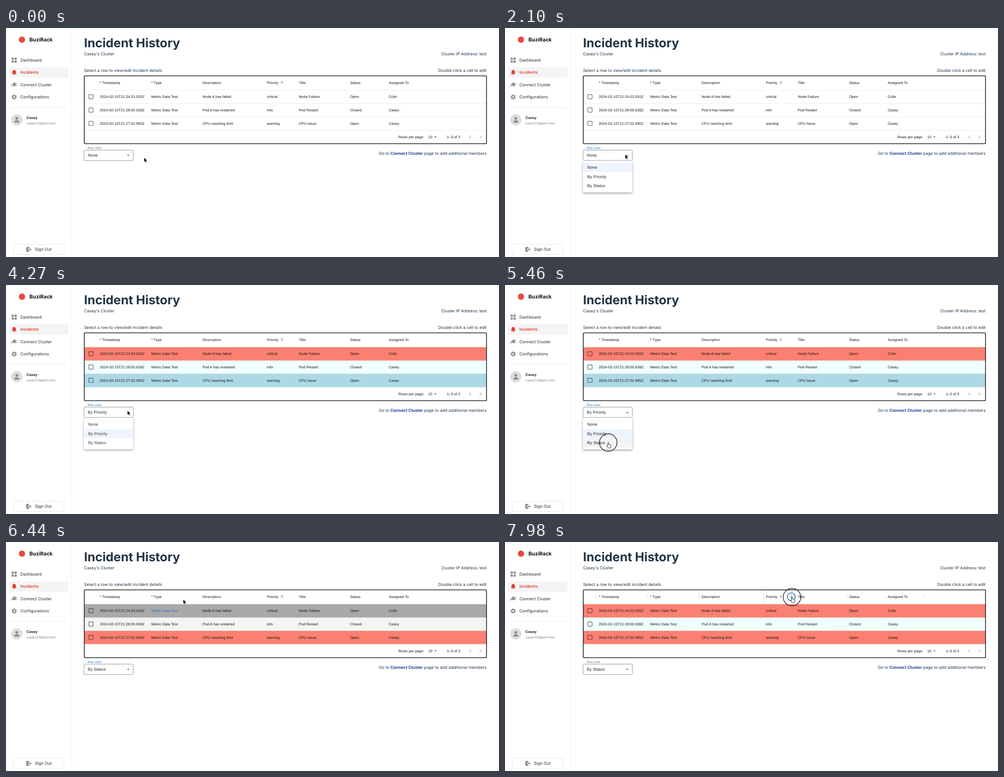
Animation of 1096x511 px, one loop 8 s. Source, as an HTML page:

```html
<!DOCTYPE html>
<html lang="en">
<head>
<meta charset="utf-8">
<title>Incident History</title>
<style>
  html, body { margin: 0; width: 100%; height: 100%; overflow: hidden; background: #fff; }
  svg { display: block; width: 100vw; height: 100vh; text-rendering: geometricPrecision; }
  text { white-space: pre; }
  .ui { font: 9.14px Inter, sans-serif; fill: #213547; }
  .side { font: 9.14px Inter, sans-serif; fill: #27272a; }
  .grid { font: 8px "Liberation Sans", Arial, sans-serif; letter-spacing: .0107em; fill: #111; }
  .field { font: 9.14px "Liberation Sans", Arial, sans-serif; letter-spacing: .0094em; fill: #222; }
  .label { font: 6.86px "Liberation Sans", Arial, sans-serif; letter-spacing: .0094em; }
  .end { text-anchor: end; }
  .icon { fill: #8e8e95; }
  #menu { filter: drop-shadow(0 2.3px 2.5px rgba(0,0,0,.38)); transform-origin: 228px 296px; }
</style>
</head>
<body>
<svg viewBox="0 0 1096 511" preserveAspectRatio="none">
  <!-- sidebar -->
  <path d="M146 0V511" stroke="#f0f0f1"/>
  <circle cx="35.5" cy="26" r="7" fill="#ea4a3c"/>
  <text class="side" x="52" y="30" style="font-size:11.43px;font-weight:700;fill:#111">BuziRack</text>
  <rect x="7" y="87.5" width="132" height="23" rx="3.5" fill="#f4f4f5"/>
  <g class="side">
    <text x="32" y="74.8">Dashboard</text>
    <text x="32" y="102.3" style="font-weight:600;fill:#e04032">Incidents</text>
    <text x="32" y="129.8">Connect Cluster</text>
    <text x="32" y="157.2">Configurations</text>
    <text x="64.5" y="497.3">Sign Out</text>
    <text x="45.5" y="202.6" style="font-size:8px;font-weight:700">Casey</text>
    <text x="45.5" y="214.6" style="font-size:6.86px;fill:#747a85">casey123@exm.test</text>
  </g>
  <g class="icon">
    <rect x="12.5" y="66" width="5" height="5" rx="1"/><rect x="19" y="66" width="5" height="5" rx="1"/>
    <rect x="12.5" y="72.5" width="5" height="5" rx="1"/><rect x="19" y="72.5" width="5" height="5" rx="1"/>
    <path d="M18.2 93.5q3.7.4 3.8 4.3v2.7l1.2 2.2H13.2l1.2-2.2v-2.7q.1-3.9 3.8-4.3zM16.6 103.4h3.2q-.3 1.5-1.6 1.5t-1.6-1.5z" fill="#e04032"/>
    <path d="M15.5 124l1.5-2h4.5v1.3H25v1.2h-3.5v2.6H25v1.2h-3.5v1.4H17l-1.5-2q-2.2 0-2.4 3.6h-1.3q0-6.3 3.7-6.3z"/>
    <g fill="none" stroke="#8e8e95"><circle cx="18.2" cy="154" r="3.2" stroke-width="2.6"/>
      <circle cx="18.2" cy="154" r="4.9" stroke-width="1.9" stroke-dasharray="2.4 2.73"/></g>
    <path d="M46.5 488.5h5.3v3h-2.3v5h2.3v3h-5.3q-1.5 0-1.5-1.5v-8q0-1.5 1.5-1.5zM50.5 493h3v-2l3.5 3-3.5 3v-2h-3z"/>
  </g>
  <path d="M8 177H138" stroke="#ebebed"/>
  <circle cx="24" cy="205" r="12.5" fill="#dcdcdc"/>
  <g fill="#8b8b8b"><circle cx="24" cy="201.8" r="3"/><path d="M18.5 211q0-5 5.5-5t5.5 5z"/></g>
  <rect x="16.5" y="482.5" width="112.5" height="23" rx="3" fill="none" stroke="#e6e6e8"/>

  <!-- page text -->
  <g class="ui">
    <text x="173.5" y="42.5" style="font-size:27.43px;font-weight:700">Incident History</text>
    <text x="173.5" y="61.2">Casey's Cluster</text>
    <text x="173.5" y="97.6">Select a row to view/edit incident details</text>
    <text class="end" x="1068.5" y="61.2">Cluster IP Address: test</text>
    <text class="end" x="1068.5" y="97.6">Double click a cell to edit</text>
    <text class="end" x="1068.5" y="282.7">Go to <tspan font-weight="700" fill="#1e40a0">Connect Cluster</tspan> page to add additional members</text>
  </g>

  <!-- table -->
  <g id="table"></g>
  <g id="seps" stroke="#d2d2d2"></g>
  <rect id="focus" x="574.5" y="107.5" width="71" height="31" fill="none" stroke="#d3d8de"/>
  <g id="dots">
    <circle id="halo" cx="636.5" cy="122.5" r="9" fill="#f3f5f8"/>
    <g fill="#666"><circle cx="636.5" cy="119.4" r=".9"/><circle cx="636.5" cy="122.4" r=".9"/><circle cx="636.5" cy="125.4" r=".9"/></g>
  </g>
  <path d="M613.5 125.8v-6.3M610.6 122.2l2.9-2.9 2.9 2.9" fill="none" stroke="#777" stroke-width=".9"/>
  <g class="grid">
    <text x="872.5" y="245.5">Rows per page:</text><text x="938.8" y="245.5">10</text><text x="980" y="245.5">1–3 of 3</text>
  </g>
  <path d="M952 241.7h5.6l-2.8 2.9z" fill="#666"/>
  <path d="M1033.8 239.8l-3.2 3.2 3.2 3.2M1053.2 239.8l3.2 3.2-3.2 3.2" fill="none" stroke="#aaa" stroke-width="1.1"/>
  <rect x="174" y="106.8" width="894.3" height="151.5" rx="2.5" fill="none" stroke="#16191c" stroke-width="1.6"/>

  <!-- select -->
  <text class="label" id="label" x="181.5" y="270">Row color</text>
  <rect x="173.5" y="272.5" width="109.5" height="23.3" rx="2.5" fill="none" stroke="#8c8c8c"/>
  <text class="field" id="value" x="181.8" y="287.4"></text>
  <path id="caret" d="M-2.9-1.4h5.8L0 1.5z" fill="#666"/>
  <g id="menu">
    <rect x="173.3" y="296" width="109.4" height="70.8" rx="2.3" fill="#fff"/>
    <g id="items"></g>
    <clipPath id="clip"><rect id="clipRow" x="173.3" width="109.4" height="20.6"/></clipPath>
    <circle id="ripple" clip-path="url(#clip)" fill="#000" fill-opacity=".18"/>
  </g>

  <circle id="ring" r="19.5" fill="none" stroke="#1c1c1c" stroke-width="1.4"/>
  <path id="arrow" d="M0 0V10.2L2.3 8.1 3.9 11.7 5.6 10.9 4 7.5H7.1z" fill="#000" stroke="#fff" stroke-width=".6"/>
  <path id="hand" d="M-1 7V.8a1 1 0 0 1 2 0V4.3q1.5-.6 1.9.4 1.4-.4 1.7.5 1.4-.2 1.4 1V8q0 2.2-1.2 4H-.6q-.9-2-2.5-4-.5-1.3.5-1.4.7 0 1.6 1.2z" fill="#fff" stroke="#111" stroke-width=".9" stroke-linejoin="round"/>
</svg>
<script>
const $ = id => document.getElementById(id);
const set = (el, attrs) => { for (const k in attrs) el.setAttribute(k, attrs[k]); };
const show = (el, on) => { el.style.display = on ? '' : 'none'; };

const columns = [208.5, 323, 437, 580, 651, 765, 851];
const heads = ['* Timestamp', '* Type', 'Description', 'Priority', 'Title', 'Status', 'Assigned To'];
const rows = [
  ['2024-02-15T21:24:23.020Z', 'Metric Data Test', 'Node A has failed', 'critical', 'Node Failure', 'Open', 'Colin'],
  ['2024-02-15T21:28:00.638Z', 'Metric Data Test', 'Pod A has restarted', 'info', 'Pod Restart', 'Closed', 'Casey'],
  ['2024-02-15T21:27:02.995Z', 'Metric Data Test', 'CPU reaching limit', 'warning', 'CPU Issue', 'Open', 'Casey']
];
const options = ['None', 'By Priority', 'By Status'];
const themes = [
  ['#fff', '#fff', '#fff'],
  ['#fa8072', '#f0ffff', '#add8e6'],
  ['#fa8072', '#f0ffff', '#fa8072']
];
const hoverFill = ['#a9a9a9', '#f4f4f4', '#a9a9a9'];
const rowTop = i => 138.9 + 29.7 * i;
const itemTop = i => 300.6 + 20.6 * i;

const line = (cells, y) => cells.map((s, i) => `<text class="grid" x="${columns[i]}" y="${y}">${s}</text>`).join('');
$('table').innerHTML = line(heads, 125) + rows.map((cells, i) => {
  const y = rowTop(i);
  return `<g><rect x="174" y="${y}" width="894" height="29.7"/>
    <path d="M174 ${y}H1068" stroke="#000" stroke-opacity=".12" stroke-width=".7"/>
    <rect x="184.2" y="${y + 9.8}" width="9.4" height="9.4" rx=".8" fill="none" stroke="#000" stroke-opacity=".62" stroke-width="1.2"/>
    ${line(cells, y + 17.4)}</g>`;
}).join('') + '<path d="M174 228H1068" stroke="#e0e0e0" stroke-width=".7"/>';
$('seps').innerHTML = [203, 317.3, 431.5, 574.3, 645.5, 760, 845.5, 931]
  .map(x => `<path d="M${x} 118.5v8"/>`).join('');
$('items').innerHTML = options.map((s, i) =>
  `<rect x="173.3" y="${itemTop(i)}" width="109.4" height="20.6"/>
   <text class="field" x="182.8" y="${itemTop(i) + 13.4}">${s}</text>`).join('');

const rowEls = [...$('table').querySelectorAll('g')];
const itemEls = [...$('items').querySelectorAll('rect')];

// time, x, y of the pointer
const path = [
  [140, 307, 289], [490, 302, 288], [630, 302, 288], [1120, 267, 282], [2100, 267, 282], [2520, 241, 325],
  [3360, 241, 325], [3920, 270, 280], [4410, 270, 280], [4970, 229.5, 351.5], [6160, 229.5, 351.5],
  [6440, 394, 128], [6510, 398, 125], [6650, 398, 125], [7000, 610, 98], [7070, 610, 98],
  [7420, 637, 121], [7490, 637, 121], [7700, 638, 123]
];
const clamp = v => Math.max(0, Math.min(1, v));
const between = (t, a, b) => t >= a && t < b;

function pointer(t) {
  const n = path.findIndex(k => k[0] > t);
  if (n === 0) return path[0].slice(1);
  if (n < 0) return path.at(-1).slice(1);
  const a = path[n - 1], b = path[n], p = (t - a[0]) / (b[0] - a[0]), e = p * p * (3 - 2 * p);
  return [a[1] + (b[1] - a[1]) * e, a[2] + (b[2] - a[2]) * e];
}

function menuState(t) {
  const late = t >= 4000;
  const [open, close] = late ? [4130, 5600] : [1610, 2870];
  const p = clamp((t - open) / 210);
  return { grow: p * (2 - p), alpha: p * (2 - p) * (1 - clamp((t - close) / 210)), pressed: t - close + 70 };
}

function draw(t) {
  const [x, y] = pointer(t), at = `translate(${x} ${y})`;
  const choice = t < 2800 ? 0 : t < 5530 ? 1 : 2;
  const menu = menuState(t);
  const hover = menu.alpha > 0 ? Math.floor((y - itemTop(0)) / 20.6) : -1;

  rowEls.forEach((g, i) => {
    const over = i === 1 ? between(t, 6370, 6510) : i === 0 ? between(t, 6440, 6510) : between(t, 6370, 6440);
    set(g.firstChild, { fill: over ? hoverFill[i] : themes[choice][i] });
  });
  rowEls[0].querySelectorAll('text')[1].style.fill = between(t, 6440, 6510) ? '#2c6bbd' : '';

  const inHeader = t > 6440 && y > 106;
  show($('seps'), inHeader);
  show($('dots'), inHeader && x > 580);
  show($('focus'), t >= 7980);
  set($('halo'), { stroke: t >= 7980 ? '#1f5f9f' : 'none', 'stroke-width': 1.4, 'fill-opacity': t >= 7560 ? 1 : 0 });

  $('label').style.fill = t < 1680 ? '#666' : t < 7980 ? '#1f70c1' : '#5a7083';
  $('value').textContent = options[choice];
  const up = between(t, 1680, 2800) || between(t, 4200, 5530);
  set($('caret'), { transform: `translate(271.7 284.3) scale(1 ${up ? -1 : 1})` });

  show($('menu'), menu.alpha > 0);
  $('menu').style.opacity = menu.alpha;
  const s = clamp(menu.grow * 1.2);
  $('menu').style.transform = `scale(${.75 + .25 * s}, ${.56 + .44 * s})`;
  itemEls.forEach((r, i) => set(r, {
    fill: i === choice ? (i === hover ? '#e2edfa' : '#edf4fd') : i === hover ? '#f4f4f4' : '#fff'
  }));
  const rippling = menu.pressed >= 0 && hover >= 0;
  show($('ripple'), rippling);
  if (rippling) {
    set($('clipRow'), { y: itemTop(hover) });
    set($('ripple'), { cx: x, cy: y, r: 8 + menu.pressed * .115 });
  }

  show($('ring'), [1610, 2730, 5460, 7980].some(c => between(t, c, c + 140)));
  const hand = hover >= 0 || between(t, 1260, 1680) || between(t, 3850, 4200) || t >= 7560;
  show($('hand'), hand);
  show($('arrow'), !hand);
  for (const id of ['ring', 'hand', 'arrow']) set($(id), { transform: at });
}

function tick() {
  draw(Math.floor(performance.now() % 8000 / 70) * 70);
  requestAnimationFrame(tick);
}
tick();
</script>
</body>
</html>
```
